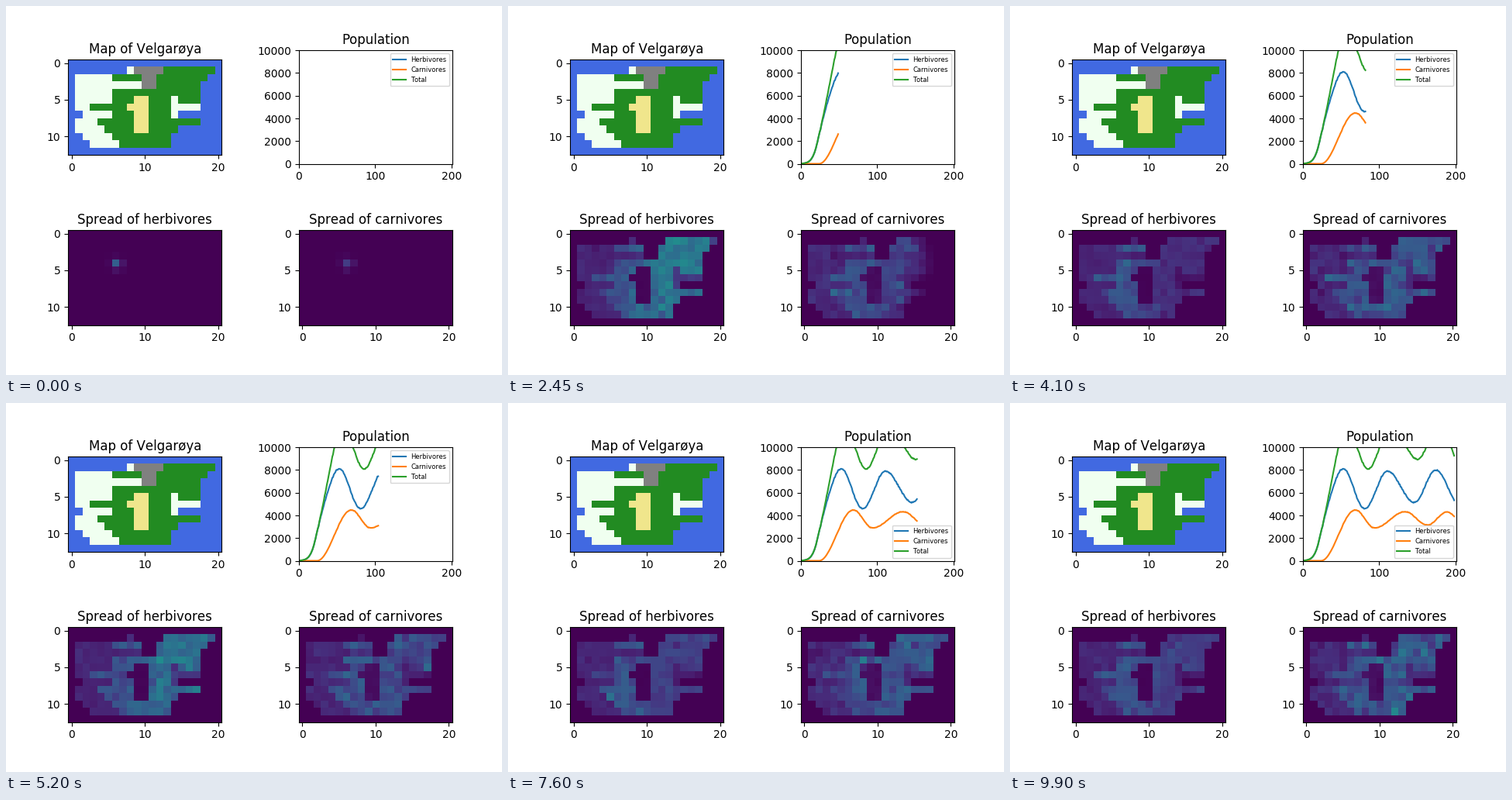
Animation, 640 px wide and 476 px high, one loop 9.95 s. Source, as a matplotlib script:

```python
import numpy as np
import matplotlib.pyplot as plt
from matplotlib.animation import FuncAnimation
from matplotlib.colors import to_rgb

FRAMES = 199
INTERVAL = 50
LEGEND_SHIFT = 120  # year when the herbivore curve reaches the legend

ISLAND = """
OOOOOOOOOOOOOOOOOOOOO
OOOOOOOOSMMMMJJJJJJJO
OSSSSSJJJJMMJJJJJJJOO
OSSSSSSSSSMMJJJJJJOOO
OSSSSSJJJJJJJJJJJJOOO
OSSSSSJJJDDJJJSJJJOOO
OSSJJJJJDDDJJJSSSSOOO
OOSSSSJJJDDJJJSOOOOOO
OSSSJJJJJDDJJJJJJJOOO
OSSSSJJJJDDJJJJOOOOOO
OOSSSSJJJJJJJJOOOOOOO
OOOSSSSJJJJJJJOOOOOOO
OOOOOOOOOOOOOOOOOOOOO
""".split()
TERRAIN = {"O": "royalblue", "M": "gray", "J": "forestgreen",
           "S": "honeydew", "D": "khaki"}
HERB_FOOD = {"O": 0, "M": 0, "J": 1, "S": 0.42, "D": 0.04}
CARN_FOOD = {"O": 0, "M": 0, "J": 1, "S": 0.45, "D": 0.15}

rng = np.random.default_rng(7)
rows, cols = np.mgrid[:len(ISLAND), :len(ISLAND[0])]
distance = np.hypot(cols - 6, rows - 4)
east = np.clip((cols - 7) / 5, 0, 1)
years = np.arange(FRAMES)


def wave(turns):
    """Cosine easing from one turning point (year, value) to the next."""
    when, value = np.array(turns, float).T
    step, frac = np.divmod(np.interp(years, when, np.arange(len(when))), 1)
    ease = (1 - np.cos(np.pi * frac)) / 2
    return np.interp(step + ease, np.arange(len(when)), value)


def wobble(curve, size):
    return curve + rng.normal(0, size, FRAMES) * np.minimum(1, curve / 3000)


def spread(food, trend, speed, peak, noise):
    """Yearly density maps; the herd fans out and the east follows trend."""
    land = np.array([[food[c] for c in row] for row in ISLAND])
    jitter = rng.normal(0, noise, (FRAMES + 1,) + land.shape)
    jitter = (jitter[1:] + jitter[:-1]) / np.sqrt(2)
    t = years[:, None, None]
    front = np.clip((1.6 + speed * t - distance) / 3, 0, 1)
    level = 0.25 * (1 - east + east * trend[:, None, None])
    start = peak * np.exp(-t / 4) * (distance == 0)
    return land * (level * front * np.clip(1 + jitter, 0.3, 2) + start)


growth = 4900 / (1 + np.exp(-0.24 * (years - 23.7)))
herb = wobble(growth + wave([(26, 0), (53, 3200), (81, -300), (111, 3000),
                             (146, 250), (174, 3100), (206, 0)]), 35)
carn = wobble(wave([(24, 15), (69, 4480), (94, 2900), (134, 4330),
                    (163, 3160), (189, 4310), (212, 3100)]), 15)
herb_maps = spread(HERB_FOOD, (herb / 6300) ** 2, 0.27, 0.18, 0.14)
carn_maps = spread(CARN_FOOD, carn / 3500, 0.20, 0.08, 0.22)

plt.rcParams["font.family"] = "DejaVu Sans"
plt.rcParams["text.kerning_factor"] = 6
fig, axes = plt.subplots(2, 2, figsize=(6.4, 4.76), dpi=100)
fig.subplots_adjust(left=0.125, right=0.9, bottom=0.11, top=0.88,
                    wspace=0.5, hspace=0.5)
(map_ax, pop_ax), (herb_ax, carn_ax) = axes


def show_grid(ax, title, data):
    ax.set_title(title)
    image = ax.imshow(data, cmap="viridis", vmin=0, vmax=1,
                      interpolation="nearest")
    ax.set_xticks([0, 10, 20])
    ax.set_yticks([0, 5, 10])
    return image


show_grid(map_ax, "Map of Velgarøya",
          [[to_rgb(TERRAIN[c]) for c in row] for row in ISLAND])
herb_image = show_grid(herb_ax, "Spread of herbivores", herb_maps[0])
carn_image = show_grid(carn_ax, "Spread of carnivores", carn_maps[0])

pop_ax.set_title("Population")
pop_ax.set_xlim(0, 201)
pop_ax.set_ylim(0, 10000)
pop_ax.set_xticks([0, 100, 200])
series = {"Herbivores": herb, "Carnivores": carn, "Total": herb + carn}
lines = [pop_ax.plot([], [], label=label)[0] for label in series]
legend = pop_ax.legend(loc="upper right", fontsize=6)


def update(year):
    for line, values in zip(lines, series.values()):
        line.set_data(years[:year + 1], values[:year + 1])
    legend.set_loc("upper right" if year < LEGEND_SHIFT else "lower right")
    herb_image.set_data(herb_maps[year])
    carn_image.set_data(carn_maps[year])
    return [*lines, legend, herb_image, carn_image]


anim = FuncAnimation(fig, update, frames=FRAMES, interval=INTERVAL,
                     init_func=lambda: update(0), repeat=True,
                     repeat_delay=0)
plt.show()
```
